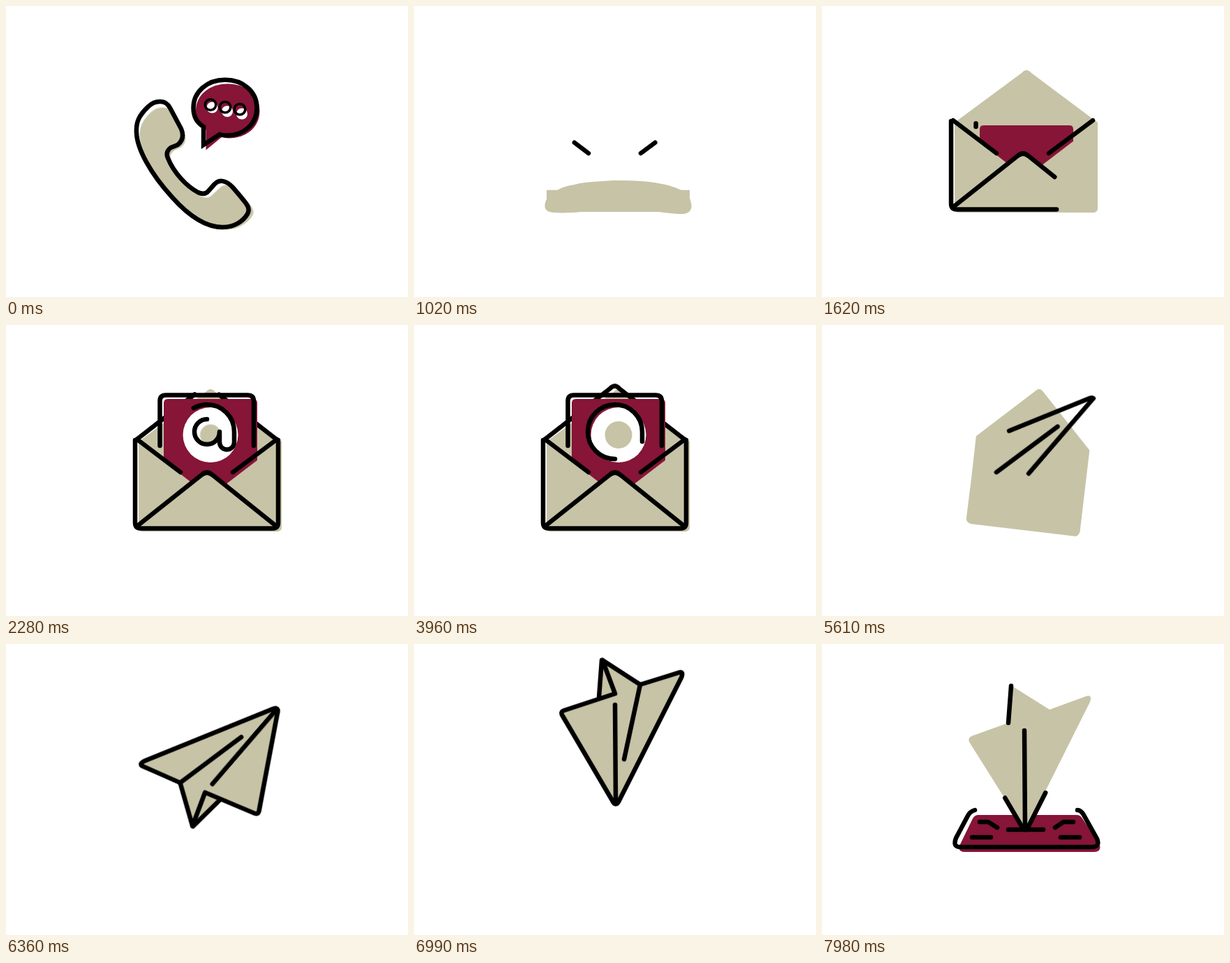
Write an HTML page that moves like this. It is 576 px wide and 417 px high and loops after 8000 ms.

```html
<!DOCTYPE html>
<html lang="en">
<head>
<meta charset="utf-8">
<title>Contact icons</title>
<style>
html, body { margin: 0; width: 100%; height: 100%; overflow: hidden; background: #fff; }
svg { display: block; width: 100%; height: 100%; }
.tan { fill: #c7c3a6; }
.red { fill: #861537; }
.white { fill: #fff; }
.line { fill: none; stroke: #000; stroke-width: 6.5; stroke-linecap: round; stroke-linejoin: round; stroke-dasharray: 100 300; }
svg * { animation: 8s ease-in-out infinite; }

/* Phone and bubble */
.phone-line { animation-name: phone-line; }
@keyframes phone-line { 0%, 5.25% { stroke-dashoffset: 0; } 11.2%, 100% { stroke-dashoffset: 101; } }
.bubble { transform-origin: 285px 200px; animation-name: bubble; }
@keyframes bubble {
  0%, 5.25% { transform: scale(1); }
  8% { transform: scale(1.2); animation-timing-function: ease-in; }
  11.3%, 100% { transform: scale(0); }
}
.blob { transform-origin: 292px 280px; animation-name: blob, blob-move, blob-show; }
@keyframes blob {
  0%, 5.25% { d: path("M221 141Q211 140 203 148C191 159 187 168 187 182C188 205 207 240 238 273C263 301 288 316 310 316C328 316 341 307 348 297Q353 290 346 281L327 260C317 250 308 250 301 257L291 266Q285 273 275 268C258 258 240 238 232 218Q228 209 236 203L246 198Q257 190 250 176L234 148Q229 141 221 141Z"); }
  11.5%, 100% { d: path("M230 256Q215 258 205 264C195 268 190 274 188 282C186 290 189 295 200 296C215 297 230 296 240 295C280 295 330 295 350 295Q365 297 378 298L386 298C396 297 399 290 397 282L395 275Q390 268 383 264C370 257 345 252 325 251Q310 250 300 250L285 250Q270 251 255 252L245 253Q236 254 230 256Z"); }
}
@keyframes blob-move {
  0%, 5.25% { transform: translate(4.5px, 4.5px) scale(1, 1); }
  11% { transform: translate(0px, 0px) scale(1.11, 1); }
  12.75% { transform: translate(0px, 0px) scale(1, 1); }
  15.5%, 100% { transform: translate(0px, 0px) scale(.96, .8); }
}
@keyframes blob-show { 0%, 15.5% { opacity: 1; } 15.6%, 100% { opacity: 0; } }

/* Envelope */
.body { animation-name: body, body-show; animation-timing-function: ease-in-out, step-end; }
@keyframes body {
  0%, 11.8% { d: path("M190 285L286 285Q293 285 300 285L395 285L395 289Q395 295 388 295L197 295Q190 295 190 289L190 287Z"); }
  12.75% { d: path("M190 264L286 264Q293 264 300 264L395 264L395 289Q395 295 388 295L197 295Q190 295 190 289L190 275Z"); animation-timing-function: ease-out; }
  18.75%, 64.5% { d: path("M190 167L286 96Q293 88 300 96L395 167L395 289Q395 296 388 296L197 296Q190 296 190 289L190 228Z"); animation-timing-function: ease-in; }
  70.125% { d: path("M221 159L306 94Q311 89 316 95L383.500 179L370 296Q368 304 361 303L213 285Q206 283 206.500 277L214 218Z"); animation-timing-function: ease-out; }
  73.75%, 100% { d: path("M193 183L384 105Q389 103 387 108L361 254L307 236Q305 235 304 237L269 271Q267 272 267 270L249 210Z"); }
}
@keyframes body-show { 0% { opacity: 0; } 12% { opacity: 1; } 73.75%, 100% { opacity: 0; } }
.pocket { animation-name: pocket; animation-timing-function: step-end; }
@keyframes pocket { 0% { opacity: 0; } 18.75% { opacity: 1; } 63%, 100% { opacity: 0; } }
.card { animation-name: card; }
@keyframes card {
  0%, 18.75% { transform: translateY(192px); animation-timing-function: cubic-bezier(.2, .7, .3, 1); }
  25%, 55% { transform: translateY(0); animation-timing-function: ease-in; }
  62%, 100% { transform: translateY(192px); }
}
.card-line { animation-name: card-line; }
@keyframes card-line {
  0%, 19.5% { stroke-dashoffset: 101; }
  26%, 54.4% { stroke-dashoffset: 0; }
  61%, 100% { stroke-dashoffset: -101; }
}
.flap { animation-name: flap; }
@keyframes flap {
  0%, 23.5% { stroke-dashoffset: 101; }
  28.5% { stroke-dashoffset: 17; animation-timing-function: ease-out; }
  30.5%, 64.5% { stroke-dashoffset: 0; }
  69%, 100% { stroke-dashoffset: 101; }
}
.side { animation-name: side; }
@keyframes side {
  0%, 11.2% { stroke-dashoffset: 101; animation-timing-function: ease-in; }
  12.75% { stroke-dashoffset: 68; animation-timing-function: ease-out; }
  16%, 55.5% { stroke-dashoffset: 0; }
  63%, 100% { stroke-dashoffset: 101; }
}
.front { animation-name: front; }
@keyframes front {
  0%, 15.4% { stroke-dashoffset: 101; }
  23%, 55.5% { stroke-dashoffset: 0; }
  64%, 100% { stroke-dashoffset: -101; }
}
.shell { animation-name: shell; }
@keyframes shell {
  0%, 15.4% { stroke-dashoffset: 101; }
  24%, 64.5% { stroke-dashoffset: 0; }
  69.5%, 100% { stroke-dashoffset: -101; }
}

/* At sign */
.disc, .dot { transform-origin: 293px 157.5px; }
.disc { animation-name: disc; }
@keyframes disc {
  0%, 24.2% { transform: scale(0); animation-timing-function: ease-out; }
  28%, 49.5% { transform: scale(1); }
  51.5% { transform: scale(1.14); animation-timing-function: ease-in; }
  54.4%, 100% { transform: scale(0); }
}
.dot { animation-name: dot; }
@keyframes dot {
  0%, 25.5% { transform: scale(0); animation-timing-function: ease-out; }
  28.5% { transform: scale(.77); animation-timing-function: ease-out; }
  35.7%, 49.5% { transform: scale(1); }
  51.2% { transform: scale(1.14); animation-timing-function: ease-in; }
  53.8%, 100% { transform: scale(0); }
}
.at { animation-name: at; }
@keyframes at {
  0%, 24.2% { stroke-dashoffset: 101; animation-timing-function: ease-in; }
  28.5% { stroke-dashoffset: 31; animation-timing-function: ease-out; }
  35.5%, 44.2% { stroke-dashoffset: 0; animation-timing-function: ease-in; }
  49.5% { stroke-dashoffset: -40; animation-timing-function: ease-out; }
  54.4%, 100% { stroke-dashoffset: -101; }
}

/* Paper plane, local origin at the nose */
.plane { animation-name: plane; }
@keyframes plane {
  0%, 74.5% { transform: translate(388.7px, 105.2px) rotate(221.1deg); }
  77.6% { transform: translate(368px, 119px) rotate(221.1deg); animation-timing-function: cubic-bezier(.6, 0, .9, .6); }
  82.8% { transform: translate(605px, -185px) rotate(221.1deg); animation-timing-function: step-end; }
  82.9%, 85% { transform: translate(289px, -10px) rotate(0deg); animation-timing-function: cubic-bezier(.2, .4, .6, .9); }
  87.375% { transform: translate(289px, 229px) rotate(0deg); animation-timing-function: ease-out; }
  93%, 100% { transform: translate(291px, 266px) rotate(0deg); }
}
.wing { animation-name: wing; animation-timing-function: step-end; }
@keyframes wing { 0% { opacity: 0; } 73.75%, 100% { opacity: 1; } }
.edge-r { animation-name: edge-r; }
@keyframes edge-r {
  0%, 67.5% { stroke-dashoffset: 101; }
  70.125% { stroke-dashoffset: 62; animation-timing-function: ease-out; }
  74.2%, 95.1% { stroke-dashoffset: 0; animation-timing-function: ease-in; }
  99.75%, 100% { stroke-dashoffset: 82; }
}
.edge-l { animation-name: edge-l; }
@keyframes edge-l {
  0%, 70.2% { stroke-dashoffset: 101; }
  74.2%, 95.1% { stroke-dashoffset: 0; animation-timing-function: ease-in; }
  99.75%, 100% { stroke-dashoffset: 81; }
}
.keel { animation-name: keel; }
@keyframes keel { 0%, 65.5% { stroke-dashoffset: 101; } 70%, 100% { stroke-dashoffset: 0; } }
.tuck { animation-name: tuck; }
@keyframes tuck { 0%, 71.5% { stroke-dashoffset: 101; } 74.2%, 100% { stroke-dashoffset: 0; } }
.fold { animation-name: fold; }
@keyframes fold {
  0%, 65.5% { stroke-dashoffset: 101; }
  70%, 95.1% { stroke-dashoffset: 0; }
  99%, 100% { stroke-dashoffset: 101; }
}

/* Tray */
.tray { transform-origin: 297px 272px; animation-name: tray; }
@keyframes tray {
  0%, 89% { transform: scale(0); animation-timing-function: ease-out; }
  94.5%, 100% { transform: scale(1); }
}
.tray-line { animation-name: tray-line; }
@keyframes tray-line { 0%, 95% { stroke-dashoffset: 101; } 99.6%, 100% { stroke-dashoffset: 0; } }
</style>
</head>
<body>
<svg viewBox="0 0 576 417">
  <clipPath id="inside"><rect width="576" height="295"/></clipPath>

  <path class="tan blob"/>
  <path class="line phone-line" pathLength="100" d="M222 137Q212 136 204 144C190 157 186 167 187 182C188 205 207 240 238 274C263 302 288 317 310 317C328 317 340 308 346 298Q350 291 344 283C338 275 332 268 325 260C316 250 306 248 299 255L291 264Q285 272 275 267C258 258 240 238 232 218Q228 209 236 203L246 199Q257 190 251 176L235 146Q230 137 222 137Z"/>
  <g class="bubble">
    <path class="red" transform="translate(3.500 4.500)" d="M283 173C273 167 268.500 157 268.500 146C268.500 123 288 107 314 107S360 123 360 146C360 169 341 185 316 185Q310 185 306 183L283 202Z"/>
    <g class="white">
      <circle cx="295.500" cy="145.500" r="8"/>
      <circle cx="317" cy="151" r="8"/>
      <circle cx="338" cy="154.500" r="8"/>
    </g>
    <path class="line phone-line" pathLength="100" style="stroke-linejoin:miter" d="M283 173C273 167 268.500 157 268.500 146C268.500 123 288 105.800 314 105.800S359.500 123 359.500 146C359.500 169 341 185.500 316 185.500Q310 185.500 306 184L283 199Z"/>
    <g fill="none" stroke="#000" stroke-width="3.600">
      <circle cx="293" cy="141.500" r="7.800"/>
      <circle cx="314" cy="145" r="7.800"/>
      <circle cx="335" cy="148" r="7.800"/>
    </g>
  </g>

  <path class="tan body"/>
  <path class="line flap" pathLength="100" d="M186 165L281 91Q284 87.500 288 87.500"/>
  <path class="line flap" pathLength="100" d="M389 165L294 91Q291 87.500 288 87.500"/>
  <g clip-path="url(#inside)">
    <path class="red card" d="M226 112Q226 106 232 106H354Q360 106 360 112V270H226Z"/>
  </g>
  <path class="tan pocket" d="M190 167L266 226L280 215Q288 208 296 215L314 229L395 167V289Q395 296 388 296H197Q190 296 190 289Z"/>
  <circle class="white disc" cx="293" cy="157.500" r="39.500"/>
  <circle class="tan dot" cx="293" cy="157.500" r="19.500"/>
  <path class="line at" pathLength="100" d="M288 135A18 18 0 1 0 306 153V168A10.500 10.500 0 0 0 327 168V153A39 39 0 1 0 288 192"/>
  <path class="line card-line" pathLength="100" d="M220.500 173V109Q220.500 100.500 229 100.500H346Q355 100.500 355 109V173"/>
  <path class="line side" pathLength="100" d="M250 211L188 164"/>
  <path class="line side" pathLength="100" d="M325 211L388 164"/>
  <path class="line front" pathLength="100" d="M188 288L280 215Q288 208 296 215L387 288"/>
  <path class="line shell" pathLength="100" d="M185 165V283Q185 291.500 193 291.500H382Q390 291.500 390 283V165"/>

  <path class="red tray" d="M224 245H365Q370 245 373 250L397 285Q402 298 390 298H205Q193 298 198 287L216 250Q219 245 224 245Z"/>
  <g class="plane">
    <path class="tan wing" d="M-3 -3Q0 0 3 -3L93 -183Q97 -194 87 -191L35 -172L-19 -206L-24 -153L-74 -135Q-84 -132 -79 -124Z"/>
    <path class="line edge-r" pathLength="100" d="M0 0Q3 0 5 -5L94 -181Q98 -191 90 -188L35 -171L-19 -206"/>
    <path class="line edge-l" pathLength="100" d="M0 0Q-3 0 -5 -5L-76 -126Q-80 -132 -74 -134L-1 -158L-19 -206"/>
    <path class="line tuck" pathLength="100" d="M-20 -206L-24 -153"/>
    <path class="line keel" pathLength="100" d="M0 0L-1 -142"/>
    <path class="line fold" pathLength="100" d="M12 -64L35 -171"/>
  </g>
  <path class="line tray-line" pathLength="100" d="M219 238Q212 240 209 246L192 278Q187 291 198 291H386Q399 291 394 279L375 245Q371 238 366 238"/>
  <path class="line tray-line" pathLength="100" d="M267 266H317"/>
  <path class="line tray-line" pathLength="100" d="M226 255H238L251 263"/>
  <path class="line tray-line" pathLength="100" d="M215 277H242"/>
  <path class="line tray-line" pathLength="100" d="M360 255H346L334 263"/>
  <path class="line tray-line" pathLength="100" d="M342 277H369"/>
</svg>
</body>
</html>
```
